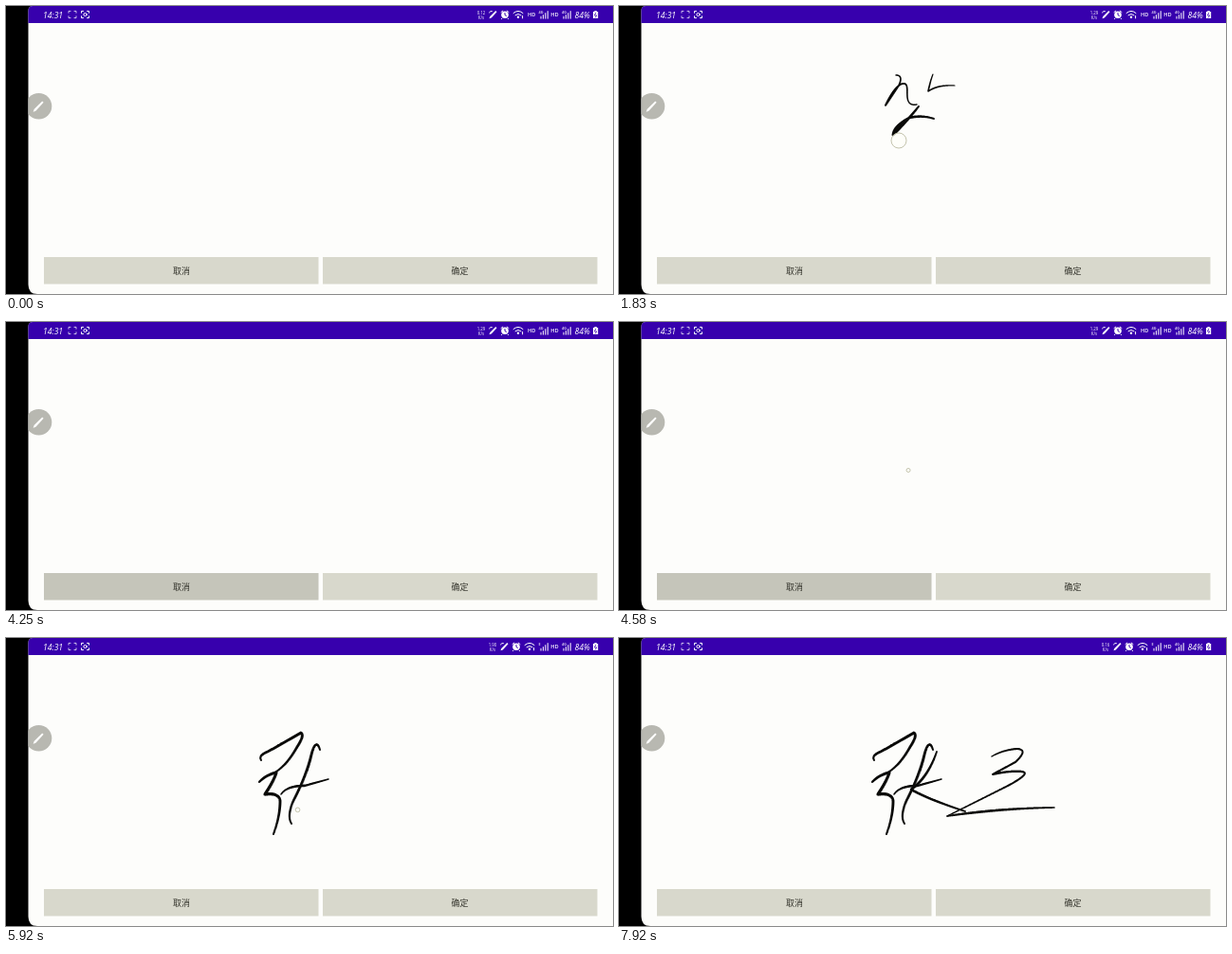
Animation, 640 px wide and 304 px high, one loop 8000 ms. Source, as an HTML page:

```html
<!DOCTYPE html>
<html lang="zh">
<head>
<meta charset="utf-8">
<title>Signature pad</title>
<style>
html, body { margin: 0; width: 100%; height: 100%; overflow: hidden; background: #000; }
svg { display: block; width: 640px; height: 304px; }
text { font-family: "Open Sans", sans-serif; fill: #fff; }
.btn { font: 9px "Noto Sans CJK SC", "Noto Sans CJK", sans-serif; fill: #34342c; text-anchor: middle; }
.time { font-size: 8.6px; font-style: italic; }
.hd { font-size: 5.6px; font-weight: 600; }
.tiny { font-size: 3.8px; font-weight: 600; }
.rate { font-size: 4.4px; text-anchor: middle; }
.line { fill: none; stroke: #fff; stroke-linecap: round; }
</style>
</head>
<body>
<svg viewBox="0 0 640 304">
  <defs>
    <clipPath id="screen"><path d="M23.5 5Q23.5 0 28.5 0H640V304H33Q23.5 304 23.5 294Z"/></clipPath>
    <path id="bars" class="line" d="M0 13V11M2.4 13V9.4M4.8 13V7.4M7.2 13V5.4"/>
    <path id="focus" class="line" d="M-4 -1.8V-3.6H-2M2 -3.6H4V-1.8M4 1.8V3.6H2M-2 3.6H-4V1.8"/>
  </defs>
  <rect width="640" height="304" fill="#000"/>
  <g clip-path="url(#screen)">
    <rect width="640" height="304" fill="#fdfdfb"/>
    <rect width="640" height="18" fill="#3700ad"/>

    <g transform="translate(0 .5)">
      <text class="time" x="39" y="12.3">14:31</text>
      <use href="#focus" x="70" y="8.5" opacity=".75"/>
      <use href="#focus" x="83.5" y="8.5"/>
      <circle class="line" cx="83.5" cy="8.5" r="1.6"/>
      <g id="icons">
        <text class="rate" id="rate" x="501" y="8.2"></text>
        <text class="rate" x="501" y="13.4">K/s</text>
        <path d="M509.5 12.8L510.3 10.4L516.3 4.6L517.5 5.8L511.8 11.9Z" fill="#fff"/>
        <path class="line" d="M509.4 6.4q1.4 -2 3 -1.4"/>
        <circle cx="526" cy="8.8" r="3.8" fill="#fff"/>
        <path class="line" d="M522 6L523.8 4.6M530 6L528.2 4.6M523 12.6L522.4 13.2M529 12.6L529.6 13.2"/>
        <path d="M526 6.6V9L527.8 10" fill="none" stroke="#3700ad"/>
        <path class="line" d="M535 7Q540 2.6 545 7M537 9.2Q540 6.6 543 9.2M544.6 12.4V10"/>
        <circle cx="540" cy="11.3" r="1.2" fill="#fff"/>
      </g>
      <text class="hd" id="hd" x="550" y="10.6">HD</text>
      <text class="tiny" id="net" x="561.5" y="7.2">4G</text>
      <use href="#bars" x="564" y="-.3"/>
      <text class="hd" x="574.3" y="10.6">HD</text>
      <text class="tiny" x="586" y="7.2">4G</text>
      <use href="#bars" x="588" y="-.3"/>
      <text class="time" x="599.5" y="12.3">84%</text>
      <path d="M619 5.4H620.4V4.4H622.8V5.4H624.2V12.6H619Z" fill="#fff"/>
      <path d="M622 6.4L620.4 9.4H622.8L621.2 11.8" fill="none" stroke="#3700ad" stroke-width=".8"/>
    </g>

    <rect x="40" y="265" width="289.5" height="28.5" fill="#d8d8cc"/>
    <rect id="press" x="40" y="265" width="289.5" height="28.5"/>
    <rect x="334" y="265" width="289.5" height="28.5" fill="#d8d8cc"/>
    <text class="btn" x="185" y="283">取消</text>
    <text class="btn" x="478.5" y="283">确定</text>

    <circle cx="34.5" cy="105.8" r="13.8" fill="#b8b8b1"/>
    <path d="M28.6 111.8L29.6 109L38.2 100.4L39.6 101.8L31.4 110.8Z" fill="#fff"/>

    <g id="ink" fill="#0a0a08"></g>
    <circle id="ring" fill="#fffff8" fill-opacity=".7" stroke="#bdbda4" stroke-width=".9"/>
  </g>
</svg>
<script>
const LOOP = 8000, TAP = 4110, CLEAR = 4250, LAG = 40, HOVER = 2, TOUCH = 8;
const $ = id => document.getElementById(id);
const clamp = v => Math.max(0, Math.min(1, v));
const mix = (a, b, k) => a + (b - a) * k;

// Each stroke: start time, pen width (0 = hovering), path of the pen.
const words = [[
  [560, 2.2, 'M292 73Q300 73 295 84L281 105Q291 84 299 82C310 80 296 107 314 104'],
  [1000, 1.8, 'M331 72Q328 80 326 90Q336 83 354 84'],
  [1450, 3, 'M316 106Q306 119 289 136Q290 127 306 118Q320 115 332 119'],
  [1830, 2, 'M295 142Q306 134 307 137L305 145Q308 139 313 139Q318 141 320 146'],
  [2200, 3.2, 'M338 132Q322 152 289 173L316 159Q340 148 370 153'],
  [2660, 2, 'M408 72Q410 82 406 89'],
  [2870, 3.8, 'M381 103L384 111Q398 99 414 98Q420 102 403 116Q412 128 408 140L403 149'],
  [3285, 2.6, 'M366 143Q400 131 430 128'],
  [TAP, 0, 'M185 280h1']
], [
  [4555, 0, 'M311 161L269 129'],
  [4760, 3.2, 'M269 129Q266 124 276 120L311 100Q315 103 307 115Q297 133 285 141'],
  [5060, 3.4, 'M267 152Q275 144 285 142Q283 150 273 165Q288 163 289 172Q289 188 282 207'],
  [5375, 2.4, 'M290 165Q296 156 315 156L340 149'],
  [5590, 3.2, 'M331 118Q327 105 322 123Q317 145 303 172Q296 188 301 196'],
  [6200, 2.8, 'M335 120Q326 147 308 160Q328 171 365 183'],
  [6600, 2.3, 'M393 125Q405 118 420 117Q432 118 418 131L394 144Q412 140 424 141Q436 142 410 156L346 188'],
  [7060, 2.5, 'M346 188Q400 180 459 179']
]].map(word => word.map(build));

// Ink is a chain of dots; the pen presses harder in the middle of a stroke.
function build([start, width, d]) {
  const path = document.createElementNS('http://www.w3.org/2000/svg', 'path');
  path.setAttribute('d', d);
  $('ink').append(path);
  const length = path.getTotalLength(), count = Math.ceil(length * 2);
  const points = [], dots = [];
  for (let i = 0; i <= count; i++) {
    const u = i / count, { x, y } = path.getPointAtLength(u * length);
    const r = width / 2 * (.65 + .35 * Math.sin(Math.PI * u ** .7));
    points.push([x, y]);
    dots.push(`M${x - r} ${y}a${r} ${r} 0 1 0 ${2 * r} 0a${r} ${r} 0 1 0 ${-2 * r} 0`);
  }
  return { start, end: start + 100 + 1.7 * length, width, points, dots, path };
}

const progress = (s, t) => clamp((t - s.start) / (s.end - s.start));

function penAt(t) {
  for (const word of words) {
    const i = word.findLastIndex(s => t >= s.start);
    if (i < 0) continue;
    const s = word[i], next = word[i + 1];
    if (t <= s.end) {
      const at = Math.round(progress(s, t) * (s.points.length - 1));
      return [...s.points[at], s.width ? TOUCH : HOVER];
    }
    if (!next) continue;
    const k = (t - s.end) / (next.start - s.end);
    const a = s.points.at(-1), b = next.points[0];
    const near = Math.abs(2 * k - 1) ** 6;
    return [mix(a[0], b[0], k), mix(a[1], b[1], k), mix(HOVER, TOUCH, near)];
  }
  return null;
}

function draw(t) {
  for (const s of words.flat()) {
    const wiped = t >= CLEAR && s.start < CLEAR;
    const k = wiped || !s.width ? 0 : progress(s, t - LAG);
    const count = Math.ceil(k * s.dots.length);
    if (count !== s.shown) s.path.setAttribute('d', s.dots.slice(0, count).join(''));
    s.shown = count;
  }
  const pen = penAt(t), ring = $('ring');
  ring.style.display = pen ? '' : 'none';
  if (pen) ['cx', 'cy', 'r'].forEach((name, i) => ring.setAttribute(name, pen[i]));

  const press = Math.min(clamp((t - TAP) / 80), 1 - clamp((t - 4600) / 250));
  $('press').setAttribute('opacity', press * .09);

  const moved = t >= 4830;
  $('icons').setAttribute('transform', `translate(${moved ? 12 : 0} 0)`);
  $('hd').style.display = moved ? 'none' : '';
  $('net').textContent = moved ? 'E' : '4G';
  $('rate').textContent = t < 1750 ? '0.12' : !moved ? '1.29' : t < 7920 ? '1.90' : '0.16';
}

const begin = performance.now();
function tick() {
  draw((performance.now() - begin) % LOOP);
  requestAnimationFrame(tick);
}
draw(0);
requestAnimationFrame(tick);
</script>
</body>
</html>
```
